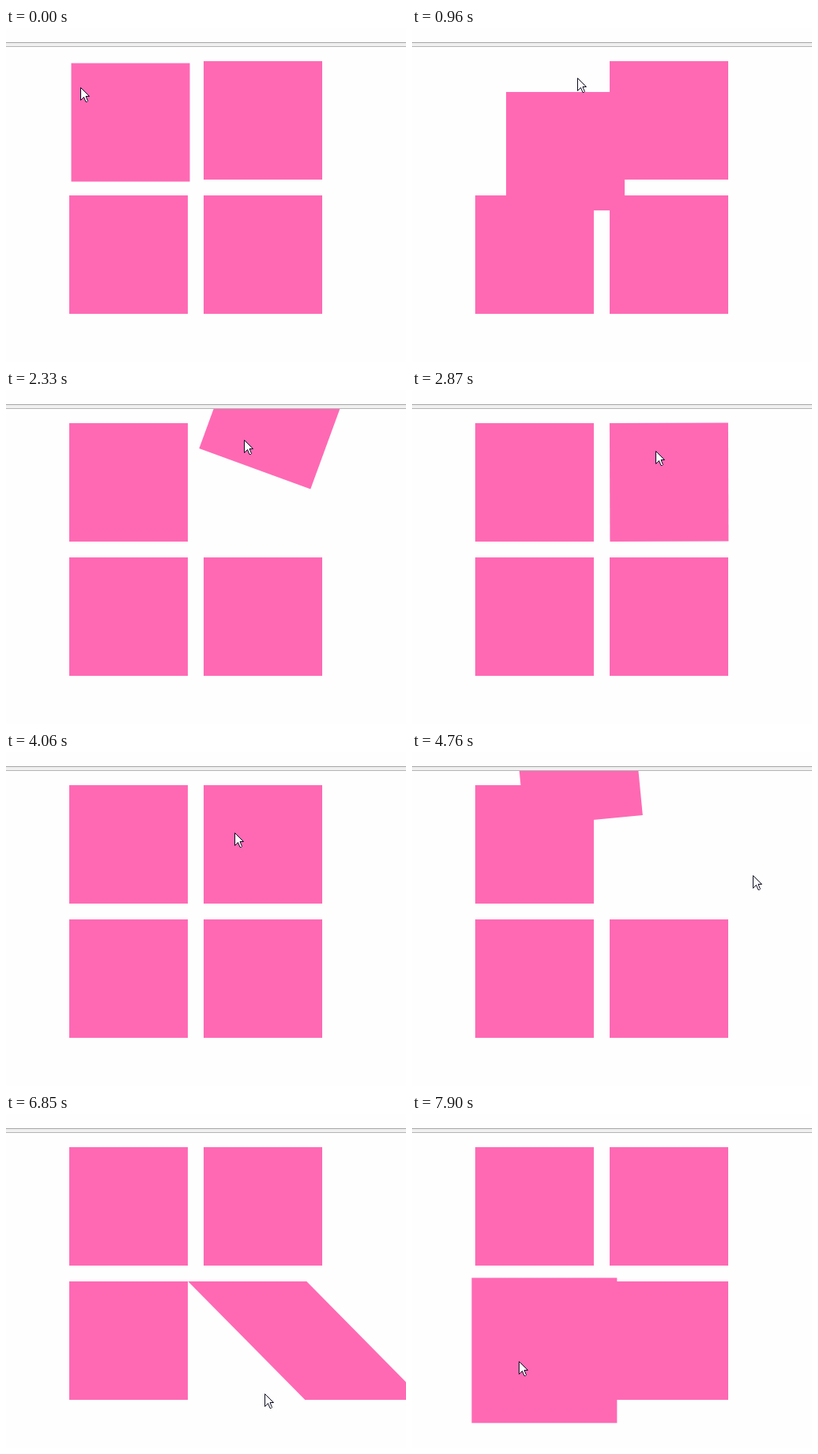
An HTML page for the animation above (8 s loop, 506 by 423 pixels).

```html
<!DOCTYPE html>
<html lang="en">
<head>
<meta charset="utf-8">
<title>Hover transforms</title>
<style>
  html, body { margin: 0; width: 100%; height: 100%; overflow: hidden; background: #fefefe; }
  #bar { position: absolute; top: 18px; left: 0; right: 0; height: 4px; background: #f0f0f0; border: solid #a5a5a5; border-width: 1px 0; border-bottom-color: #b4b4b4; }
  #page { position: absolute; top: 24px; left: 0; width: 506px; height: 399px; overflow: hidden; }
  #page div { position: absolute; width: 150px; height: 150px; background: #ff69b4; transform-origin: 20px 20px; }
  #move, #grow { left: 80px; }
  #spin, #skew { left: 250px; }
  #move, #spin { top: 18px; }
  #skew, #grow { top: 188px; }
  #cursor { position: absolute; left: 0; top: 0; width: 14px; height: 21px; overflow: visible; }
</style>
</head>
<body>
<div id="bar"></div>
<div id="page">
  <div id="move"></div>
  <div id="spin"></div>
  <div id="skew"></div>
  <div id="grow"></div>
</div>
<svg id="cursor"><path d="M.5 .5V16.5L4.5 12.5L7 18.5H8.5L9.5 17.5L7 11.5H11.5Z" fill="#fff" stroke="#0a0a20"/></svg>
<script>
const LOOP = 8000;
const $ = id => document.getElementById(id);

// Where the pointer turns or rests: [time, x, y]
const path = [[0, 94, 75], [800, 190, 95], [1100, 225, 35], [1780, 294, 49], [2870, 308, 77],
  [3243, 312, 193], [4060, 289, 102], [4480, 410, 125], [5410, 480, 226], [5560, 397, 289],
  [6000, 375, 335], [6820, 375, 335], [6850, 327, 354], [7300, 220, 402], [7900, 135, 313]];

const clamp = x => Math.min(1, Math.max(0, x));
const bezier = (p, q, s) => 3 * p * s * (1 - s) ** 2 + 3 * q * s * s * (1 - s) + s ** 3;

// CSS "ease": find the curve parameter by bisection
function ease(x) {
  if (x <= 0 || x >= 1) return clamp(x);
  let lo = 0, hi = 1;
  for (let i = 0; i < 30; i++) {
    const mid = (lo + hi) / 2;
    if (bezier(.25, .25, mid) < x) lo = mid; else hi = mid;
  }
  return bezier(.1, 1, lo);
}

// Hover transition, entered and left at the given times
const hover = (t, enter, leave = Infinity, length = 1000) =>
  ease((t - enter) / length) * (1 - ease((t - leave) / 1000));

function pointer(t) {
  const i = path.findIndex(p => p[0] > t);
  if (i < 0) return path[path.length - 1].slice(1);
  const a = path[i - 1], b = path[i], k = (t - a[0]) / (b[0] - a[0]);
  return [1, 2].map(c => Math.round(a[c] + (b[c] - a[c]) * k));
}

function draw(t) {
  const shift = 50 * hover(t, -66, 795);
  // The pointer briefly slips off the spinning square, which starts to turn back.
  const slip = 21 * Math.sin(Math.PI * clamp((t - 3300) / 160));
  const angle = 360 * hover(t, 1747, 4460, 1160) - slip;
  const [x, y] = pointer(t);
  $('move').style.transform = `translate(${shift}px, ${shift}px)`;
  $('spin').style.transform = `rotate(${angle}deg)`;
  $('skew').style.transform = `skewX(${45 * hover(t, 5560, 6834)}deg)`;
  $('grow').style.transform = `scale(${1 + hover(t, 7732)})`;
  $('cursor').style.transform = `translate(${x}px, ${y}px)`;
}

const start = performance.now();
function tick() {
  draw((performance.now() - start) % LOOP);
  requestAnimationFrame(tick);
}
tick();
</script>
</body>
</html>
```
